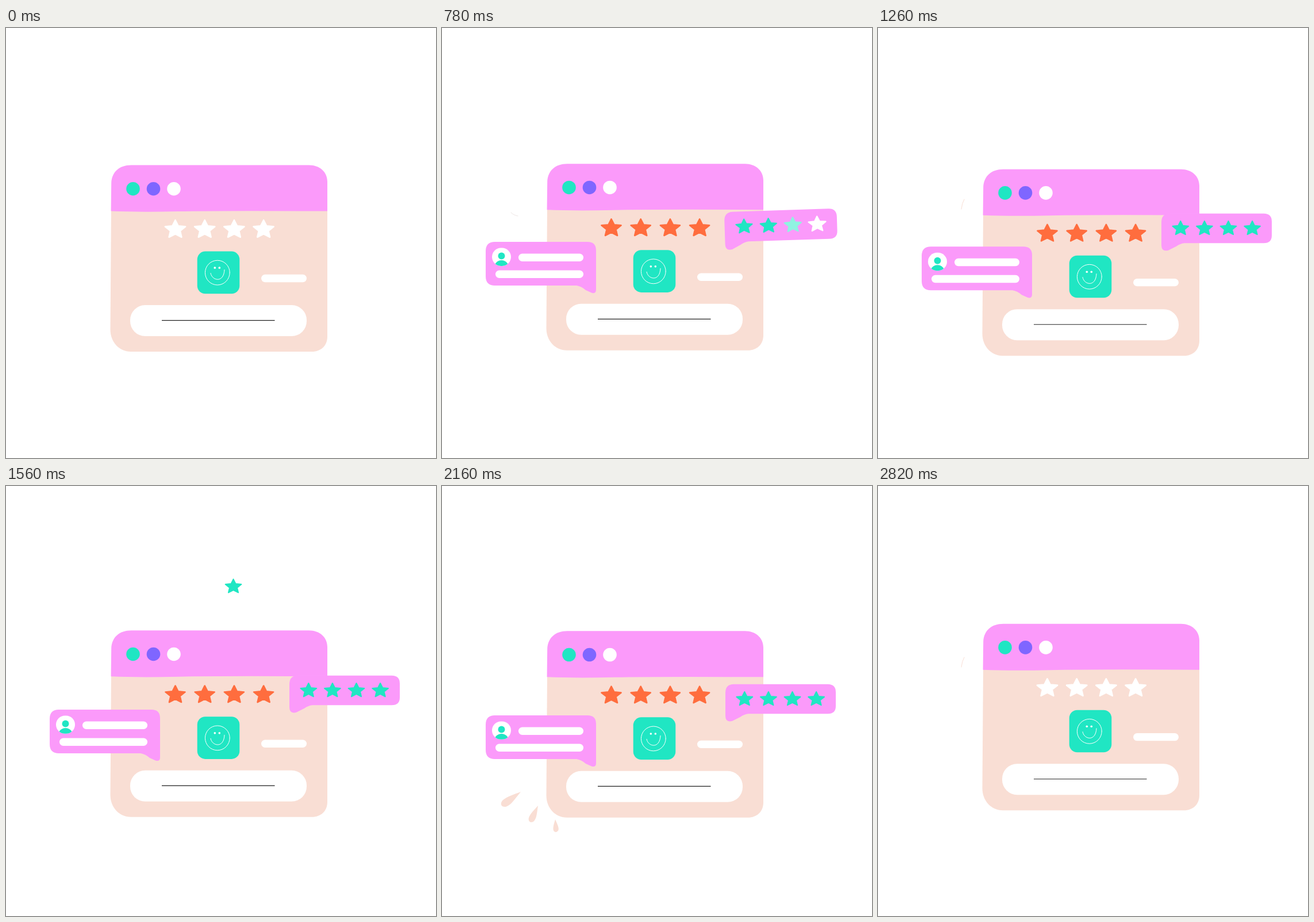
An HTML page with a canvas for the animation above (2.88 s loop, 748 by 748 pixels).

```html
<!DOCTYPE html>
<html lang="en">
<head>
<meta charset="utf-8">
<title>Review window</title>
<style>
html, body { margin: 0; width: 100%; height: 100%; overflow: hidden; background: #fff; }
canvas { display: block; }
</style>
</head>
<body>
<canvas id="stage" width="748" height="748"></canvas>
<script>
const ctx = document.getElementById('stage').getContext('2d');
const LOOP = 2880, STEP = 60;
const PINK = '#fb9afa', PEACH = '#f9ded4', TEAL = '#20e6c3', PURPLE = '#7f66ff', WHITE = '#fff';
const WHITE_RGB = [255, 255, 255], ORANGE_RGB = [255, 109, 62], TEAL_RGB = [32, 230, 195];

const path = d => new Path2D(d);
const header = path('M182.6 80L183.2 31C184 12 197 0 218 0H527C546 0 559 12 559 29V80Q370 79 300 80.5T182.6 80Z');
const body = path('M183 78L181.5 286C181.5 308 197 324.5 217 324.5H532C548 324.5 559 314 559 298V78Z');
const smile = path('M356 188C358 201 379 206 380 182');
const leftBubble = path('M92 372H253Q268 372 268 387V455Q268 463 260 460.5L250 456Q242 449 234 448H92Q76 448 76 432V388Q76 372 92 372Z');
const rightBubble = path('M508 323H671Q685 323 685 337V361Q685 374.5 671 374.5H533Q526 375 519 380L505 387Q493 390 493 378V338Q493 323 508 323Z');
const curl = path('M596 438C598 456 590 467 581 466C572 464 575 455 588 452C598 450 606 452 613 458');
const markA = path('M120 321Q125 326 132 327');
const markB = path('M145 315Q146 305 150 298');
const drop = path('M0 0C.4-.33 .65-.66 .87-.46C1.05-.2 1.04 .33 .85 .5C.6 .6 .3 .26 0 0Z');

const star = new Path2D();
for (let i = 0; i < 10; i++) {
  const r = i % 2 ? 8.5 : 18, a = i * Math.PI / 5;
  star.lineTo(r * Math.sin(a), -0.88 * r * Math.cos(a));
}
star.closePath();

const clamp = x => Math.max(0, Math.min(1, x));
const ramp = (t, start, length) => clamp((t - start) / length);
const ease = x => x * x * (3 - 2 * x);
const hump = (t, start, length) => Math.sin(Math.PI * ramp(t, start, length));

// Slow rise and fall over one loop, zero at the time `low`
const bob = (t, low, amp) => amp * (1 - Math.cos(2 * Math.PI * (t - low) / LOOP));

// Grows in with a slight overshoot, shrinks away near the end
const pop = (t, start) =>
  (ease(ramp(t, start, 300)) + 0.02 * hump(t, start + 240, 400)) * (1 - ease(ramp(t, 2280, 300)));

// Opacity that swells and fades around a moment
const flash = (t, at, half) => clamp(1.3 - Math.abs(t - at) / half * 1.3);

const mix = (a, b, k) => `rgb(${a.map((v, i) => Math.round(v + (b[i] - v) * k))})`;

function fill(shape, color) {
  ctx.fillStyle = color;
  ctx.fill(shape);
}

function disc(x, y, r, color) {
  const p = new Path2D();
  p.arc(x, y, r, 0, 7);
  fill(p, color);
}

function box(x, y, w, h, r, color) {
  const p = new Path2D();
  p.roundRect(x, y, w, h, r);
  fill(p, color);
  return p;
}

function line(shape, color, width, alpha = 1) {
  ctx.globalAlpha = alpha;
  ctx.strokeStyle = color;
  ctx.lineWidth = width;
  ctx.stroke(shape);
  ctx.globalAlpha = 1;
}

function group(x, y, scale, degrees, draw) {
  if (scale <= 0) return;
  ctx.save();
  ctx.translate(x, y);
  ctx.rotate(degrees * Math.PI / 180);
  ctx.scale(scale, scale);
  draw();
  ctx.restore();
}

function drawStar(x, y, scale, color) {
  group(x, y, scale, 0, () => {
    fill(star, color);
    line(star, color, 2.5);
  });
}

function drawWindow(t) {
  group(0, 233.9 + bob(t, 460, 10), 1, 0, () => {
    fill(body, PEACH);
    fill(header, PINK);
    [TEAL, PURPLE, WHITE].forEach((c, i) => disc(221 + i * 35.5, 41.2, 11.8, c));
    for (let i = 0; i < 4; i++) {
      const k = ramp(t, 240 + i * 60, 180) - ramp(t, 2280 + i * 60, 180);
      drawStar(294.5 + i * 51.2, 112, 1.03 - 0.03 * k, mix(WHITE_RGB, ORANGE_RGB, k));
    }
    box(332.7, 150, 73.6, 73.7, 14, TEAL);
    const face = new Path2D();
    face.arc(367.8, 187.1, 21.4, 0, 7);
    line(face, WHITE, 1);
    line(smile, WHITE, 1);
    disc(363.3, 178.6, 1.8, WHITE);
    disc(371.3, 178.6, 1.8, WHITE);
    box(444, 190.3, 79, 13.4, 6.7, WHITE);
    box(216, 243.5, 307, 54, 26, WHITE);
    box(271, 269.5, 196.5, 1.2, 0, '#222');
  });
}

function drawLeft(t) {
  const s = pop(t, 120);
  group(266, 460 + bob(t, 720, 13.5), s, 90 * (s - 1), () => {
    ctx.translate(-266, -460);
    fill(leftBubble, PINK);
    const badge = box(87, 382.5, 33, 31.3, 15.6, WHITE);
    disc(103.5, 396.5, 6, TEAL);
    ctx.save();
    ctx.clip(badge);
    disc(103.5, 417, 13, TEAL);
    ctx.restore();
    for (let i = 0; i < 2; i++) {
      const grown = ease(ramp(t, 270 + i * 70, 250));
      if (grown) box(133 - i * 40, 392.5 + i * 29, (113 + i * 40) * grown, 13.4, 6.7, WHITE);
    }
  });
}

function drawRight(t) {
  const s = pop(t, 300);
  group(497, 385 + bob(t, 960, 13.3) - 10 * (1 - s), s, 97 * (1 - s), () => {
    ctx.translate(-497, -388);
    fill(rightBubble, PINK);
    for (let i = 0; i < 4; i++) {
      const k = ramp(t, 600 + i * 60, 120);
      drawStar(526.3 + i * 41.6, 349, 0.86 - 0.05 * k, mix(WHITE_RGB, TEAL_RGB, k));
    }
  });
}

// Three drops fan out from the window's lower corner, each smaller than the last
function drawDrops(t) {
  for (let i = 0; i < 3; i++) {
    const length = 41 - i * 9.5;
    group(137 + i * 30, 532 + i * 24, 1.05 * hump(t, 1920, 600), 144 - i * 29, () => {
      ctx.translate(16 * ramp(t, 2160, 360), 0);
      ctx.scale(length, 13 - i * 2);
      fill(drop, PEACH);
    });
  }
}

function draw(t) {
  ctx.fillStyle = WHITE;
  ctx.fillRect(0, 0, 748, 748);
  ctx.lineJoin = ctx.lineCap = 'round';
  line(markA, '#eee6e4', 1, flash(t, 780, 90));
  line(markB, PEACH, 1, flash(t, 1260, 90) + flash(t, 2800, 80));
  drawWindow(t);
  line(curl, PEACH, 1.1, flash(t, 490, 130));
  drawLeft(t);
  drawRight(t);
  drawStar(395.5, 175, 1.12 * hump(t, 1380, 700), TEAL);
  drawDrops(t);
}

const start = performance.now();
function frame() {
  const t = (performance.now() - start) % LOOP;
  draw(Math.floor(t / STEP) * STEP);
  requestAnimationFrame(frame);
}
frame();
</script>
</body>
</html>
```
